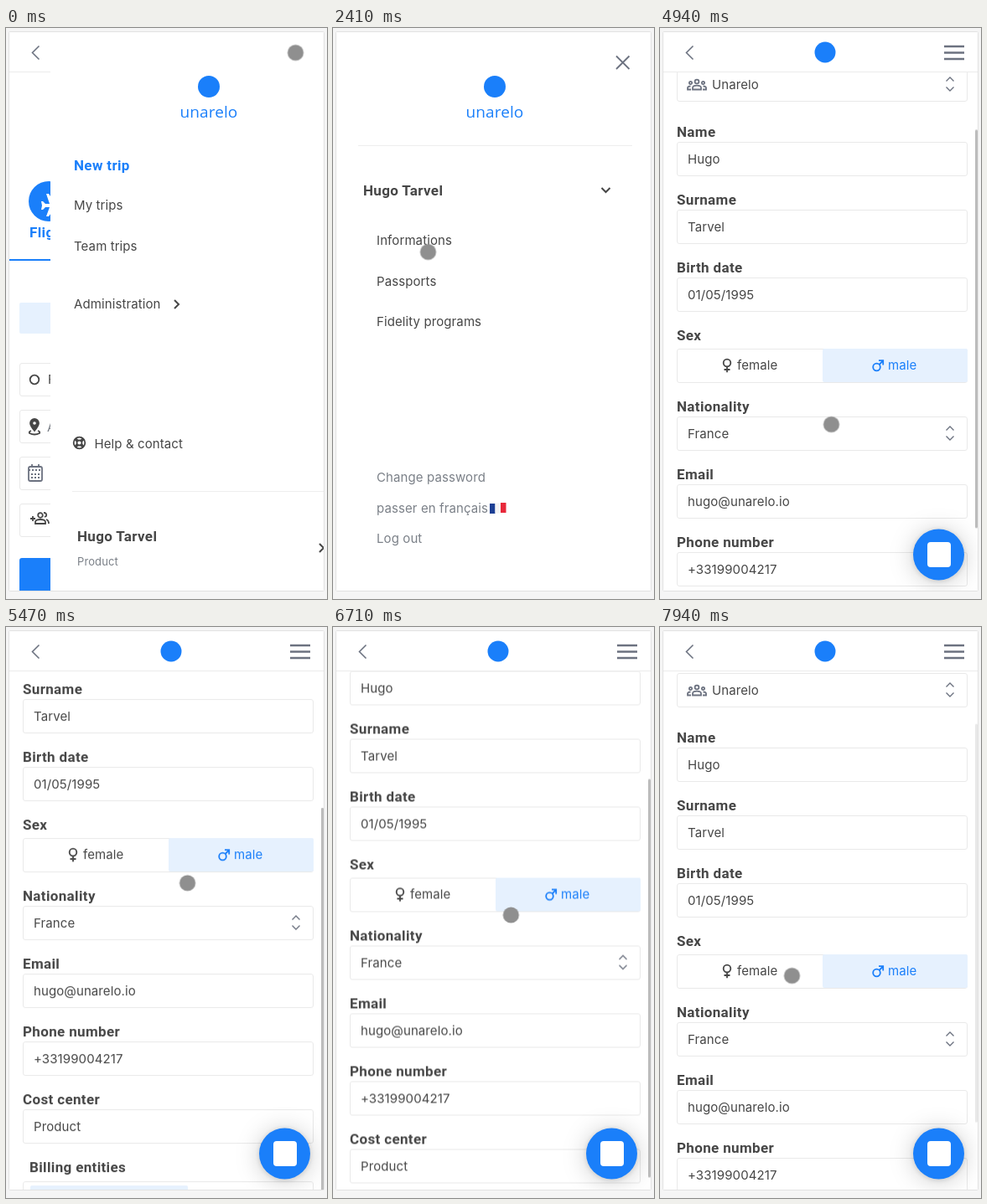
These frames come from a looping animation (383 px wide and 682 px high, 8 s). An HTML page:

```html
<!DOCTYPE html>
<html lang="en">
<head>
<meta charset="utf-8">
<title>Travel app profile</title>
<style>
html, body { margin: 0; width: 100%; height: 100%; overflow: hidden; background: #f5f5f5; }
svg { display: block; width: 383px; height: 682px; }
text { font: 15px Inter, sans-serif; letter-spacing: .1px; fill: #464646; white-space: pre; }
.bold { font: 700 17px Roboto, sans-serif; letter-spacing: .35px; }
.dim { fill: #7b8088; }
.small { font-size: 13px; }
.blue { fill: #1a7ffa; }
.brand { font: 19px "Open Sans", sans-serif; text-anchor: middle; }
.tag { font-weight: 700; font-size: 14px; }
.initials { font-size: 20px; font-weight: 300; fill: #ffe3e3; text-anchor: middle; }
.box { fill: #fff; stroke: #e9e9e9; }
.line { fill: none; stroke: #464646; stroke-width: 1.8; }
.gray { stroke: #6c7280; }
.male { stroke: #1a7ffa; }
#chat { filter: drop-shadow(0 1px 3px #0002) drop-shadow(0 2px 14px #0003); }
</style>
</head>
<body>
<svg id="stage" viewBox="0 0 383 682"></svg>
<script>
const BLUE = '#1a7ffa', PALE = '#e6f1fe', LOOP = 8000;

const text = (x, y, s, cls = '') => `<text x="${x}" y="${y}" dy=".36em" class="${cls}">${s}</text>`;
const rect = (x, y, w, h, fill, r = 0) => `<rect x="${x}" y="${y}" width="${w}" height="${h}" rx="${r}" fill="${fill}"/>`;
const box = (x, y, w, h) => `<rect x="${x + .5}" y="${y + .5}" width="${w - 1}" height="${h - 1}" rx="2.5" class="box"/>`;
const disc = (x, y, r, fill) => `<circle cx="${x}" cy="${y}" r="${r}" fill="${fill}"/>`;
const ring = (x, y, r) => `<circle cx="${x}" cy="${y}" r="${r}"/>`;
const line = (d, cls = '', w = 1.8) => `<path d="${d}" class="line ${cls}" style="stroke-width:${w}"/>`;
const icon = (x, y, body, cls = '') => `<g transform="translate(${x} ${y})" class="line ${cls}">${body}</g>`;
const group = (id, ...parts) => `<g id="${id}">${parts.join('')}</g>`;
const column = (x, y, step, items, draw) => items.map((s, i) => draw(x, y + i * step, s)).join('');
const page = rect(4, 5, 376, 668, '#fff');

const people = (x, y) => icon(x, y,
  ring(0, -3.5, 2.4) + ring(-7.5, -2, 1.6) + ring(7.5, -2, 1.6) +
  '<path d="M-5 6v-2q0-2.8 5-2.8t5 2.8v2zM-7 6h-4v-2q0-2 3.5-2M7 6h4v-2q0-2-3.5-2"/>', 'gray');
const sorter = y => line(`M341.5 ${y - 3.5}l4.5-4.5l4.5 4.5M341.5 ${y + 3.5}l4.5 4.5l4.5-4.5`, 'gray', 1.4);
const field = (x, y, [label, value]) =>
  text(x, y, label, 'bold') + box(x, y + 12, 347, 41) + text(x + 13, y + 33, value);

const flight = group('flight', page,
  disc(51, 207, 24, BLUE),
  '<path d="M42 207h2l3 3h5l-4-12h3l8 12h8q3 2 0 4h-8l-8 11h-3l4-11h-5l-3 3h-2l1-5z" fill="#fff"/>',
  text(28, 244, 'Flight', 'bold blue'),
  rect(4, 276, 376, 2, BLUE),
  rect(16, 328, 350, 37, PALE, 2),
  column(16, 400, 56, [0, 1, 2, 3], (x, y) => box(x, y, 350, 40)),
  icon(34, 420, ring(0, 0, 5.3)), text(50, 420, 'From'),
  icon(34, 476, '<path d="M0 5q-5-6-5-9a5 5 0 0 1 10 0q0 3-5 9z" fill="#464646"/><path d="M-4 5q-3 1-2 3q6 3 12 0q1-2-2-3"/>'),
  disc(34, 472, 1.8, '#fff'), text(49, 477, 'Arrival', 'dim'),
  icon(35, 532, '<rect x="-8" y="-8" width="16" height="17" rx="2"/><path d="M-8-4h16M-4-11v4M4-11v4M-5 1h10M-5 5h10" stroke-dasharray="2 2"/>', 'gray'),
  icon(41, 586, ring(0, -4, 2.8) + '<path d="M-12 0h6M-9-3v6M-6 6v-2q0-3 6-3t6 3v2zM4-7q4 0 3 4l-2 1M7 1q3 1 3 5"/>'),
  rect(16, 633, 350, 60, BLUE, 3));

const fields = group('fields',
  column(20, 173, 81, [['Name', 'Hugo'], ['Surname', 'Tarvel'], ['Birth date', '01/05/1995']], field),
  text(20, 416, 'Sex', 'bold'),
  box(20, 432, 347, 41), rect(194, 432, 173, 40, PALE, 2),
  icon(80, 449, ring(0, 0, 4.3) + '<path d="M0 4.3v7M-3.5 8h7"/>'),
  text(92, 452, 'female'),
  icon(258.5, 454, ring(0, 0, 4.3) + '<path d="M3-3l4.5-4.5M2.5-7.8h5.2v5.2"/>', 'male'),
  text(272, 452, 'male', 'blue'),
  column(20, 501, 81, [['Nationality', 'France'], ['Email', 'hugo@unarelo.io'],
    ['Phone number', '+33199004217'], ['Cost center', 'Product']], field),
  sorter(533),
  text(28, 825, 'Billing entities', 'bold'),
  box(20, 842, 347, 41), rect(29, 847, 188, 31, PALE, 2),
  text(45, 863, 'Unarelo FRANCE SAS', 'tag blue'),
  line('M203 858.5l6 6m0-6l-6 6', 'male', 1.2));

const profile = group('profile', page,
  group('scroll',
    rect(20, 83, 41, 41, '#ff8080', 2), text(40.5, 102, 'HT', 'initials'),
    text(77, 89, 'Hugo Tarvel'), text(77, 117, 'Product', 'small dim'),
    group('chip', box(247, 94, 120, 43), people(272, 116), text(295, 116, 'Unarelo')),
    group('select', box(20, 135, 347, 41), people(44, 155.5), text(62, 156, 'Unarelo'), sorter(155)),
    fields));

const header = group('header',
  rect(4, 5, 376, 48, '#fff'), rect(4, 52, 376, 1, '#ececec'),
  line('M39.5 21.5l-8 8l8 8', 'gray', 1.6),
  disc(197, 29, 12.5, BLUE),
  line('M339 22h24M339 29.5h24M339 37h24', 'gray', 2.4));

const chat = group('chat', disc(332.5, 629, 30.5, BLUE), rect(319, 614, 28, 30, '#fff', 4));

const panel = group('panel',
  rect(4, 140, 376, 950, '#fff'), rect(30, 140, 327, 1, '#eee'),
  text(36, 193.5, 'Hugo Tarvel', 'bold'),
  group('closed', text(36, 224, 'Product', 'small dim'), line('M325 203l5 5l-5 5', '', 2)),
  group('opened', line('M320.5 191l5 5l5-5', '', 2),
    column(52, 254, 48.5, ['Informations', 'Passports', 'Fidelity programs'], text)));

const drawer = group('drawer', page,
  line('M338 33.5l15.5 15.5M353.5 33.5l-15.5 15.5', 'gray'),
  disc(193, 70, 13, BLUE), text(193, 100, 'unarelo', 'brand blue'),
  text(32, 164, 'New trip', 'bold blue'),
  column(32, 212, 49, ['My trips', 'Team trips'], text),
  text(32, 330, 'Administration'), line('M152 325l5 5l-5 5', '', 2),
  icon(38.5, 495.5, ring(0, 0, 6.8) + ring(0, 0, 3) +
    '<path d="M-5-5l3 3M5-5l-3 3M-5 5l3-3M5 5l-3-3" stroke-width="3.5"/>'),
  text(56.5, 497, 'Help &amp; contact'),
  panel,
  group('links',
    column(52, 537, 36.5, ['Change password', 'passer en français', 'Log out'], (x, y, s) => text(x, y, s, 'dim')),
    column(187, 568, -.5, ['#1c3f94', '#f4f4f4', '#e8283a'], (x, y, c) => rect(x + (568 - y) * 13, y, 6.5, 12, c))));

document.getElementById('stage').innerHTML =
  `<clipPath id="frame">${rect(4, 5, 375, 667, '#000')}</clipPath><g clip-path="url(#frame)">` +
  flight + profile + header + chat +
  group('bar',
    group('longBar', rect(376, 58, 3, 497, '#bcbcbc', 1.5)),
    group('shortBar', rect(376, 58, 3, 476, '#bcbcbc', 1.5))) +
  drawer + '</g>' +
  '<rect x="3.5" y="4.5" width="376" height="668" rx="1" fill="none" stroke="#e2e2e2"/>' +
  group('cursor', disc(0, 0, 9.6, '#8f8f8f'));

// Each move is [start, end, value, easing]; the value rests between moves.
function play(id, prop, first, moves) {
  const frames = [{ offset: 0, [prop]: first }];
  let value = first;
  for (const [start, end, next, easing = 'ease-in-out'] of moves) {
    frames.push({ offset: start / LOOP, [prop]: value, easing }, { offset: end / LOOP, [prop]: next });
    value = next;
  }
  frames.push({ offset: 1, [prop]: value });
  document.getElementById(id).animate(frames, { duration: LOOP, iterations: Infinity });
}
const at = (x, y) => `translate(${x}px, ${y}px)`;
const slide = (id, first, moves) =>
  play(id, 'transform', at(...first), moves.map(([a, b, p, e]) => [a, b, at(...p), e]));
const fade = (id, first, ...moves) => play(id, 'opacity', first, moves);
const cut = (id, time, shown) => fade(id, 1 - shown, [time, time, shown]);

const SWAP = 2900, RELAYOUT = 4060, BAR_RATIO = .72;

// Drags: [start, end, cursor, easing, scroll offset]
const drags = [
  [4600, 4940, [204.5, 473.5], 'ease-in', 88],
  [5000, 5800, [220, 257], 'ease-out', 257],
  [6180, 7120, [207.5, 399.5], 'ease-in-out', 117],
  [7400, 7800, [157.5, 416.5], 'ease-in-out', 80]
];
slide('cursor', [345.5, 29.5], [
  [500, 1060, [197.5, 623.5]],
  [1330, 1650, [206.5, 536.5]],
  [1960, 2400, [113.5, 267.5]],
  [2480, 2590, [116.5, 256.5]],
  [3800, 4530, [205, 561]],
  ...drags
]);
const scrollBy = k => drags.map(([a, b, , e, s]) => [a, b, [0, s * k], e]);
slide('scroll', [0, 0], scrollBy(-1));
slide('shortBar', [0, 0], scrollBy(BAR_RATIO));

slide('drawer', [49, 0], [[50, 110, [0, 0]], [SWAP, 3280, [380, 0]]]);
slide('panel', [0, 413], [[1320, 1650, [0, 0]]]);
fade('closed', 1, [1320, 1450, 0]);
fade('opened', 0, [1350, 1650, 1]);
fade('links', 0, [1400, 1650, 1]);

cut('flight', SWAP, 0);
cut('profile', SWAP, 1);
cut('chat', SWAP, 1);
slide('fields', [0, 0], [[RELAYOUT, RELAYOUT, [0, 39]]]);
cut('chip', RELAYOUT, 0);
cut('select', RELAYOUT, 1);
cut('shortBar', RELAYOUT, 1);
fade('longBar', 0, [3285, 3285, 1], [3500, 3585, 0]);
fade('bar', 1, [7860, 7960, .3]);
</script>
</body>
</html>
```
